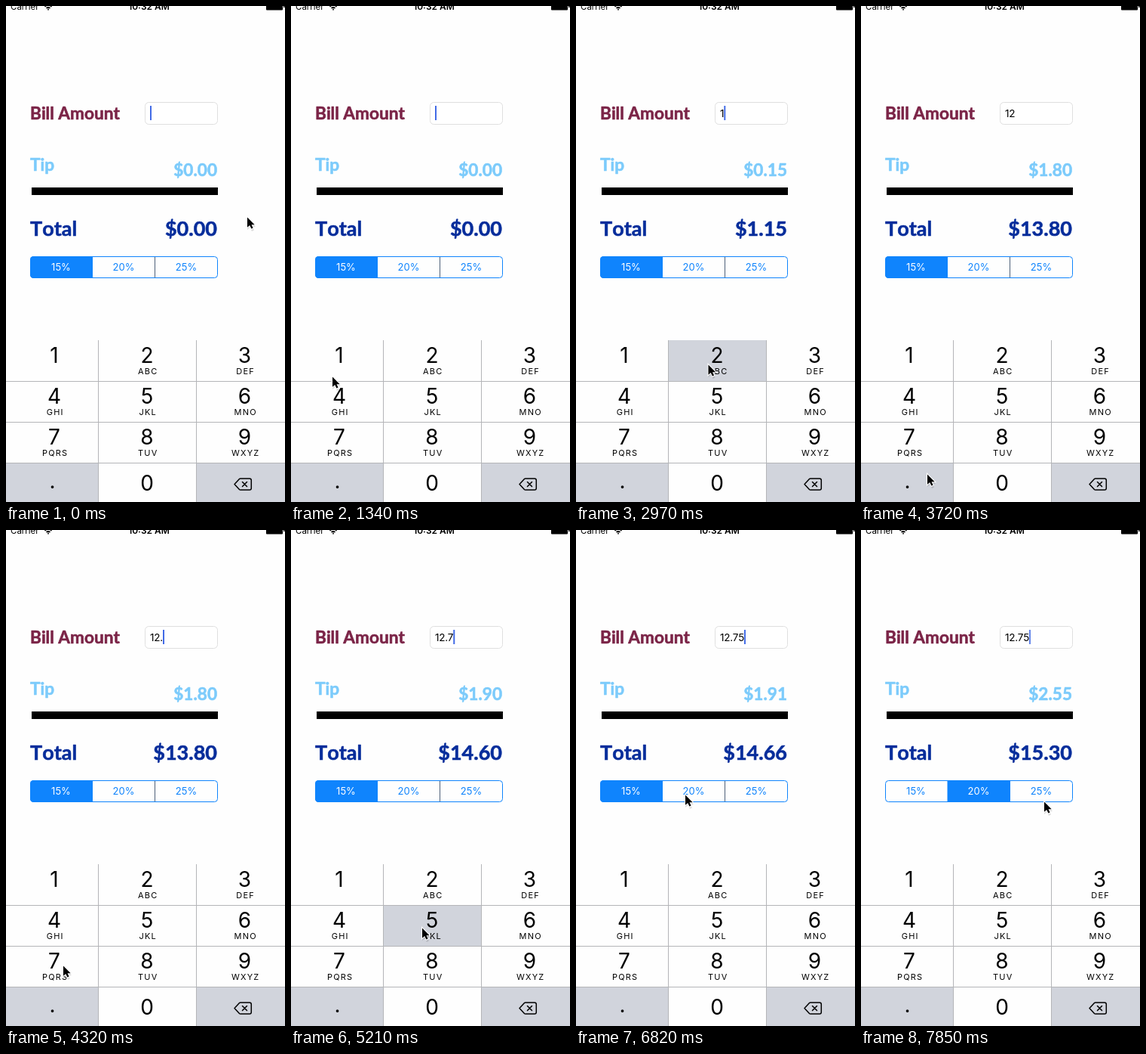
Write an HTML page that moves like this. It is 370 by 656 pixels and loops after 7.99 s.

```html
<!DOCTYPE html>
<html lang="en">
<head>
<meta charset="utf-8">
<title>Tip calculator</title>
<style>
  html, body { margin: 0; width: 100%; height: 100%; overflow: hidden; background: #fefefe; }
  svg { display: block; width: 100%; height: 100%; }
  text { font-family: Inter, Roboto, sans-serif; white-space: pre; }
  .mid { text-anchor: middle; }
  .status { font-size: 11.5px; }
  .clock { font-weight: 600; font-size: 12px; }
  .marker {
    font: 700 22.6px Lato, sans-serif; font-kerning: none;
    fill: currentColor; stroke: currentColor; stroke-width: .6px; stroke-linejoin: round;
  }
  .big { font-size: 27px; }
  .end { text-anchor: end; }
  .bill { color: #7b2447; }
  .tip { color: #7ccbfb; }
  .total { color: #072d9b; }
  .entry { font-size: 13.5px; letter-spacing: -.2px; }
  .segment { font-size: 13px; fill: #0f84fd; }
  .segment.on { fill: #fff; }
  .digit { font-size: 28px; }
  .letters { font-size: 11px; letter-spacing: 1.2px; }
</style>
</head>
<body>
<svg viewBox="0 0 370 656" preserveAspectRatio="none">
  <rect width="370" height="656" fill="#fefefe"/>

  <text class="status" x="6" y="5">Carrier</text>
  <g fill="none" stroke="#000" stroke-width="1.6">
    <path d="M51.5 1Q56-3 60.5 1M53.5 3Q56 .8 58.5 3"/>
    <path d="M56 3.5V5.5"/>
  </g>
  <text class="clock mid" x="189.5" y="5">10:32 AM</text>
  <path d="M345 0H367V4.5Q367 5.5 366 5.5H346Q345 5.5 345 4.5ZM368 0H369.5V2H368Z"/>

  <text class="marker bill" x="32" y="149.5">Bill Amount</text>
  <rect x="184.5" y="127.5" width="96" height="29" rx="5" fill="#fff" stroke="#dfdfdf"/>
  <text class="entry" id="entry" x="191" y="147"></text>
  <rect id="caret" y="132" width="2" height="19" fill="#426be6"/>

  <text class="marker tip" x="32" y="217.5">Tip</text>
  <text class="marker tip end" id="tip" x="280" y="224.5"></text>
  <rect x="34" y="240" width="247" height="10"/>
  <text class="marker big total" x="32" y="304">Total</text>
  <text class="marker big total end" id="total" x="280" y="304"></text>

  <clipPath id="pill"><rect x="32" y="331" width="249" height="29" rx="4.5"/></clipPath>
  <rect id="selected" y="331" width="83.5" height="29" fill="#0f84fd" clip-path="url(#pill)"/>
  <rect x="32.5" y="331.5" width="248" height="28" rx="4" fill="none" stroke="#0f84fd"/>
  <path id="divider" d="M197.5 332V359" stroke="#4d6078"/>
  <g id="segments"></g>

  <g id="keys"></g>
  <path d="M122.5 442V656M252.5 442V656M0 496.5H370M0 550.5H370M0 604.5H370"
        stroke="#b4b5b8" fill="none"/>
  <g id="labels"></g>
  <g fill="none" stroke="#000" stroke-width="1.5" stroke-linejoin="round" stroke-linecap="round">
    <path d="M303 632.5L309.500 625.5Q310 625 311 625H323Q325.3 625 325.3 627.3V637.7Q325.3 640 323 640H311Q310 640 309.5 639.5Z"/>
    <path d="M313.5 629.5L319.5 635.5M319.5 629.5L313.5 635.5"/>
  </g>

  <g id="cursor">
    <path d="M1 2V18L4.5 15 7 20 10 18.5 8 14H12Z" fill="#000" opacity=".13"/>
    <path d="M1 1.5V14.8L4.2 11.9 6.4 16.6 8.6 15.6 6.5 11.2H10.7Z"
          stroke="#fff" stroke-width="2" paint-order="stroke"/>
  </g>
</svg>
<script>
const LOOP = 7990, TICK = 148, BLINK = 1000;
const PALE = '#d1d4dc', WHITE = '#fefefe';
const $ = id => document.getElementById(id);

function add(parent, tag, attrs, text = '') {
  const node = document.createElementNS('http://www.w3.org/2000/svg', tag);
  for (const name in attrs) node.setAttribute(name, attrs[name]);
  node.textContent = text;
  return $(parent).appendChild(node);
}

const rates = [15, 20, 25];
const segments = rates.map((rate, i) =>
  add('segments', 'text', { class: 'segment mid', x: 73 + 83 * i, y: 350 }, rate + '%'));

// Keypad
const edges = [0, 122, 252, 370], centers = [64, 187, 316.5];
const letters = ['', 'ABC', 'DEF', 'GHI', 'JKL', 'MNO', 'PQRS', 'TUV', 'WXYZ'];
const keys = {};
[...'123456789.0<'].forEach((key, i) => {
  const col = i % 3, row = Math.floor(i / 3), top = 442 + 54 * row;
  keys[key] = add('keys', 'rect', { x: edges[col], y: top, width: edges[col + 1] - edges[col], height: 54 });
  if (key === '<') return;
  const x = key === '.' ? 61.5 : centers[col];
  const baseline = key === '.' ? 34 : key === '0' ? 37 : 30;
  add('labels', 'text', { class: 'digit mid', x, y: top + baseline }, key);
  if (letters[i]) add('labels', 'text', { class: 'letters mid', x: x + 1.2, y: top + 45 }, letters[i]);
});

// Pointer stops: tick, x, y
const stops = [
  [0, 319, 278], [2, 319, 278], [9, 54, 489], [11, 52, 491], [14, 55, 491], [16, 55, 491],
  [17, 155, 466], [19, 175, 472], [21, 174, 474], [24, 88, 617], [25, 87, 618], [27, 87, 618],
  [29, 75, 575], [32, 75, 575], [35, 173, 525], [38, 178, 526], [40, 250, 541],
  [42, 348, 452], [44, 235, 366], [46, 144, 349], [49, 147, 350], [53, 242, 358]
];
const presses = [[17, 18, '1'], [20, 21, '2'], [26, 27, '.'], [31, 33, '7'], [35, 36, '5']];
const entries = [[0, ''], [18, '1'], [21, '12'], [27, '12.'], [33, '12.7'], [36, '12.75']];
const RATE_CHANGE = 48;

function pointerAt(tick) {
  const i = stops.findIndex(stop => stop[0] > tick);
  if (i < 0) return stops[stops.length - 1].slice(1);
  const [t0, x0, y0] = stops[i - 1], [t1, x1, y1] = stops[i];
  const p = (tick - t0) / (t1 - t0), ease = p * p * (3 - 2 * p);
  return [x0 + (x1 - x0) * ease, y0 + (y1 - y0) * ease];
}

function caretOpacity(age) {
  const p = age % BLINK;
  if (p < 500) return 1;
  return p < 750 ? Math.max(0, 1 - (p - 500) / 90) : Math.max(0, (p - 880) / 120);
}

// Rounds half a cent down
const money = value => '$' + (Math.ceil(value * 100 - 0.5 - 1e-6) / 100 || 0).toFixed(2).replace('-', '');

function draw(time) {
  const tick = Math.floor(time / TICK);
  const [typedAt, entry] = entries.filter(e => e[0] <= tick).pop();
  const pressed = presses.find(([from, to]) => tick >= from && tick < to);
  const choice = tick < RATE_CHANGE ? 0 : 1;
  const bill = Number(entry), tip = bill * rates[choice] / 100;

  $('entry').textContent = entry;
  $('caret').setAttribute('x', 191 + $('entry').getComputedTextLength());
  $('caret').setAttribute('opacity', caretOpacity((tick - typedAt) * TICK));
  $('tip').textContent = money(tip);
  $('total').textContent = money(bill + tip);

  $('selected').setAttribute('x', 31.5 + 83 * choice);
  $('divider').setAttribute('opacity', 1 - choice);
  segments.forEach((node, i) => node.classList.toggle('on', i === choice));

  for (const key in keys) {
    const pale = '.<'.includes(key) !== Boolean(pressed && pressed[2] === key);
    keys[key].setAttribute('fill', pale ? PALE : WHITE);
  }
  $('cursor').setAttribute('transform', `translate(${pointerAt(tick)})`);
}

const start = performance.now();
function frame() {
  draw((performance.now() - start) % LOOP);
  requestAnimationFrame(frame);
}
frame();
</script>
</body>
</html>
```
